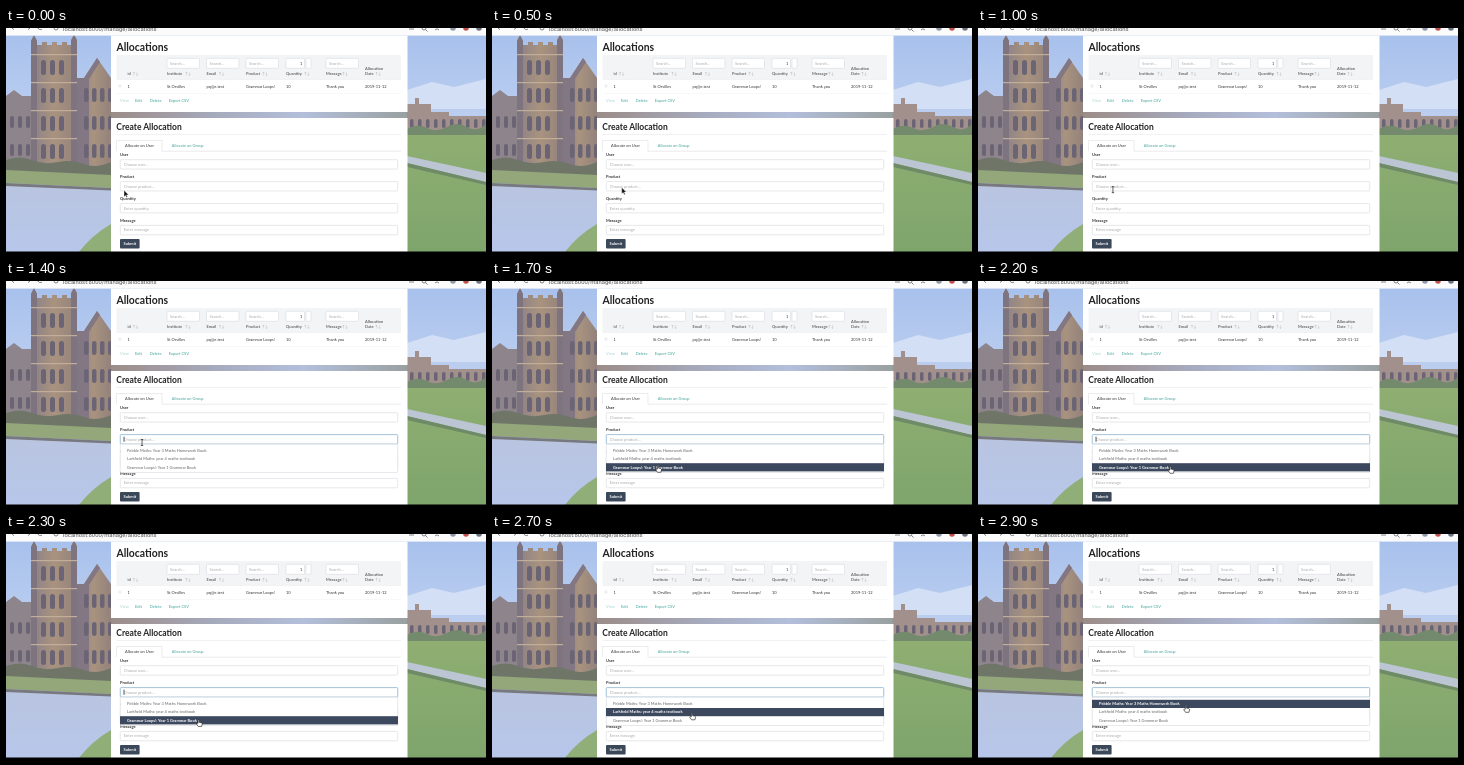
Recreate the animation shown at these times as an HTML page. Size 480 by 225 pixels, loop 3 s.

```html
<!DOCTYPE html>
<html lang="en">
<head>
<meta charset="utf-8">
<title>Allocations</title>
<style>
html, body { margin: 0; width: 100%; height: 100%; overflow: hidden; background: #fff; }
svg { display: block; width: 480px; height: 225px; }
text { font: 4px Lato, sans-serif; fill: #333; white-space: pre; }
.b { font-weight: 700; }
.head { font-weight: 700; fill: #666; }
.h { font-size: 10.4px; font-weight: 700; fill: #222; }
.h2 { font-size: 8.5px; }
.teal { fill: #3fa39a; }
.pale { fill: #a9d5d0; }
.hint { fill: #aaa; }
.item { fill: #666; }
.on { fill: #fff; font-weight: 700; }
.url { font: 5.9px Roboto, sans-serif; fill: #555; }
.field { fill: #fff; stroke: #dddee2; stroke-width: .7; }
.field.open { stroke: #9cc0d8; stroke-width: .9; }
</style>
</head>
<body>
<svg id="stage" viewBox="0 0 480 225">
  <defs>
    <linearGradient id="sky" x2="0" y2="1">
      <stop stop-color="#a6c0ec"/><stop offset="1" stop-color="#cbd8f2"/>
    </linearGradient>
    <linearGradient id="path" x2="0" y2="1">
      <stop stop-color="#b9c4dd"/><stop offset="1" stop-color="#b7c6ea"/>
    </linearGradient>
    <linearGradient id="stone" x2="1" y2="0">
      <stop stop-color="#8b8088"/><stop offset=".5" stop-color="#a9937f"/><stop offset="1" stop-color="#93827c"/>
    </linearGradient>
    <linearGradient id="lawn" x2="0" y2="1">
      <stop stop-color="#8fae72"/><stop offset="1" stop-color="#7ea56c"/>
    </linearGradient>
    <linearGradient id="strip">
      <stop stop-color="#9b8c88"/><stop offset=".35" stop-color="#a6aabd"/>
      <stop offset=".65" stop-color="#b3bfdb"/><stop offset="1" stop-color="#99a0a0"/>
    </linearGradient>
  </defs>
  <g id="photo"></g>
  <g id="page"></g>
  <g id="menu"></g>
  <g id="cursor"></g>
</svg>
<script>
const $ = id => document.getElementById(id);
const rect = (x, y, w, h, fill, r = 0) =>
  `<rect x="${x}" y="${y}" width="${w}" height="${h}" rx="${r}" fill="${fill}"/>`;
const text = (x, y, s, cls = '') => `<text x="${x}" y="${y}" class="${cls}">${s}</text>`;
const field = (x, y, w, h, cls = '') =>
  `<rect x="${x}" y="${y}" width="${w}" height="${h}" rx=".8" class="field ${cls}"/>`;
const shape = (d, fill) => `<path d="${d}" fill="${fill}"/>`;
const dot = (x, y, r, fill) => `<circle cx="${x}" cy="${y}" r="${r}" fill="${fill}"/>`;
const windows = (x0, x1, dx, y, w, h) => {
  let s = '';
  for (let x = x0; x < x1; x += dx) s += rect(x, y, w, h, '#6a6474', w / 2);
  return s;
};

function photo() {
  let s = rect(0, 0, 480, 150, 'url(#sky)') +
    shape('M401 62l25-8 22 5 32-8v30h-79z', '#d3dff5');
  // tower with a low wing on the left and a gabled wing on the right
  s += shape('M0 68l8-6 8 6h9v76H0z', '#8d848c') +
    shape('M70 50h8l13-20 14 20v98H70z', 'url(#stone)') +
    shape('M70 50h8l13-20 3 4-11 17v96H70z', '#837783') +
    shape('M25 13l3-6 3 6v4h5v-3h5v3h5v-3h5v3h5v-3h5v3h4v-5l3-6 3 6v136H25z', 'url(#stone)') +
    shape('M25 13l3-6 3 6v132h-6zM65 13l3-6 3 6v134h-6z', '#7d7480');
  for (const y of [32, 60, 88, 116]) {
    s += rect(25, y - 6, 46, 1.2, '#c2ad98') + windows(35, 62, 9, y, 5, 15);
    if (y > 50) s += windows(78, 104, 8, y, 4.5, 14);
    if (y > 70) s += windows(4, 22, 8, y, 4, 12);
  }
  // left ground
  s += rect(0, 140, 105, 85, 'url(#path)') +
    shape('M0 132q14-5 26 0t26 2 26 2 27-2v14H0z', '#6f7668') +
    shape('M0 142l105 5v13L0 155z', '#93a77b') +
    shape('M0 155l105 5v2.5L0 158z', '#77797f') +
    shape('M105 196v29H72q14-18 33-29z', '#8fae78');
  // right wing, trees and lawn
  return s + rect(105, 84, 296.5, 6, 'url(#strip)') +
    shape('M401 76h8v-6h4v6h12v8h18v4h37v20h-79z', '#a1908c') + windows(404, 478, 8, 91, 3.5, 9) +
    shape('M401 101q10-6 20-1t20-1 20 0 19-3v14h-79z', '#748a6c') +
    rect(401, 107, 79, 118, 'url(#lawn)') +
    shape('M401 128l79 17v9l-79-19z', '#bcc5d3') +
    shape('M401 135l79 19v3l-79-18z', '#6f8a67');
}

function page() {
  let s = rect(0, 0, 480, 7.6, '#fbfbfc') + text(57, 2.7, 'localhost:8000/manage/allocations', 'url') +
    '<g fill="none" stroke="#666" stroke-width=".8"><path d="M6 0l2 1.7M22 1.5L24 0M32 0a2.5 2.5 0 0 0 4 1"/><circle cx="50" cy="0" r="2"/><path d="M403 1h5"/><circle cx="418" cy="0" r="2"/><path d="M419.5 1.5l2 2M429 2l2-1.2 2 1.2"/></g>' +
    dot(447, 0, 2.8, '#8f99ab') + dot(460, 0, 2.8, '#c0504d') + dot(473, 0, 2.8, '#6b7482') +
    rect(105, 7.6, 296.5, 76.4, '#fff') + rect(105, 90, 296.5, 134, '#fff') +
    text(110.5, 22.5, 'Allocations', 'h') +
    rect(110.5, 27, 284.5, 24, '#f3f4f6') + rect(110.5, 51, 284.5, .5, '#e4e5e9');

  for (const x of [161, 200.5, 240, 320]) s += field(x, 30.3, 32.5, 10) + text(x + 3, 36.9, 'Search...', 'hint');
  s += field(280, 30.3, 18.5, 10) + field(300, 30.3, 5, 10) + text(294, 36.9, '1');

  const cols = [[121.5, 'id', '1', 5], [161, 'Institute', 'St Orvilles', 18], [200.5, 'Email', 'pq@e.test', 12],
    [240, 'Product', 'Grammar Loops!', 16], [280, 'Quantity', '10', 18], [320, 'Message', 'Thank you', 16]];
  for (const [x, head, cell, gap] of cols) {
    s += text(x, 46.6, head, 'head') + text(x, 59.5, cell) + text(x + gap, 46.6, '↑↓', 'hint');
  }
  s += text(359, 41.8, 'Allocation', 'head') + text(359, 47.2, 'Date', 'head') + text(369, 47.2, '↑↓', 'hint') +
    text(359, 59.5, '2019-11-12') + field(112.8, 57, 2.2, 2.2) + rect(110.5, 65.5, 284.5, .4, '#ededf0') +
    text(114, 74.4, 'View', 'pale') + text(129, 74.4, 'Edit', 'teal') +
    text(143.8, 74.4, 'Delete', 'teal') + text(162.7, 74.4, 'Export CSV', 'teal');

  s += text(110.3, 101.8, 'Create Allocation', 'h h2') + rect(110.5, 106.3, 284.5, .5, '#e2e2e6') +
    '<path d="M110.5 123.2v-10.7h45.5v10.7h239" fill="none" stroke="#dfe0e4" stroke-width=".6"/>' +
    text(119, 119.3, 'Allocate on User') + text(165.8, 119.3, 'Allocate on Group', 'teal');

  const rows = [['User', 'Choose user...'], ['Product', 'Choose product...'],
    ['Quantity', 'Enter quantity'], ['Message', 'Enter message']];
  rows.forEach(([label, hint], i) => {
    const y = 131.7 + i * 21.9;
    s += text(114, y - 3.8, label, 'b') + field(114.3, y, 277.4, 9.4) + text(117.8, y + 6, hint, 'hint');
  });
  return s + rect(114, 211, 19.6, 9.6, '#3b485a', 1) + text(117.6, 217.3, 'Submit', 'on') +
    rect(0, 223.5, 480, 1.5, '#000');
}

const items = ['Pebble Maths: Year 3 Maths Homework Book', 'Larkfield Maths: year 4 maths textbook',
  'Grammar Loops!: Year 1 Grammar Book'];
const OPEN = 1200, ROW_TOP = 165.8, ROW = 8.2;

function menu(t, y) {
  if (t < OPEN) return '';
  const active = Math.floor((y - ROW_TOP) / ROW);
  let s = field(114.3, 153.6, 277.4, 9.4, 'open') + text(117.8, 159.6, 'Choose product...', 'hint') +
    field(114.3, 163.2, 277.4, 28.3);
  if ((t - OPEN) % 1000 < 500) s += rect(117.6, 155.6, .8, 5.2, '#333');
  items.forEach((name, i) => {
    const top = ROW_TOP + i * ROW;
    if (i === active) s += rect(114, top, 278, ROW, '#3b485e');
    s += text(121, top + 5.4, name, i === active ? 'on' : 'item');
  });
  return s;
}

const arrow = '<path d="M0 0v6.4l1.5-1.3 1 2.2 1-.5-1-2.1h2.1z" fill="#111" stroke="#fff" stroke-width=".4"/>';
const beam = '<path d="M-1.2 0h2.4M0 0v6M-1.2 6h2.4" fill="none" stroke="#222" stroke-width=".7"/>';
const hand = '<path d="M-.6 3.6V.6q.6-1 1.2 0v2l2.2.5q.9.3.7 1.4l-.6 2.3H-.5l-1.7-2.5q0-1 .9-.7z" fill="#fff" stroke="#111" stroke-width=".6"/>';

// [time, x, y] of the pointer tip
const track = [[0, 118, 162.3], [500, 129.7, 159.4], [1100, 136, 158.5], [1400, 136, 158.5], [1700, 166, 184.5],
  [1900, 190.5, 178], [2100, 191, 179], [2200, 192.5, 185.5], [2500, 193, 186], [2700, 200, 179],
  [2800, 206, 172], [2900, 208, 171.5], [3000, 208, 171.5]];

function pointer(t) {
  const i = track.findIndex(k => k[0] > t);
  const [t0, x0, y0] = track[i - 1], [t1, x1, y1] = track[i];
  const p = (t - t0) / (t1 - t0);
  return [x0 + (x1 - x0) * p, y0 + (y1 - y0) * p];
}

$('photo').innerHTML = photo();
$('page').innerHTML = page();

let last = -1;
function draw() {
  const t = Math.floor(performance.now() % 3000 / 100) * 100;
  if (t !== last) {
    last = t;
    const [x, y] = pointer(t);
    $('menu').innerHTML = menu(t, y);
    $('cursor').innerHTML = t < 1000 ? arrow : y < 164 ? beam : hand;
    $('cursor').setAttribute('transform', `translate(${x} ${y})`);
  }
  requestAnimationFrame(draw);
}
draw();
</script>
</body>
</html>
```
